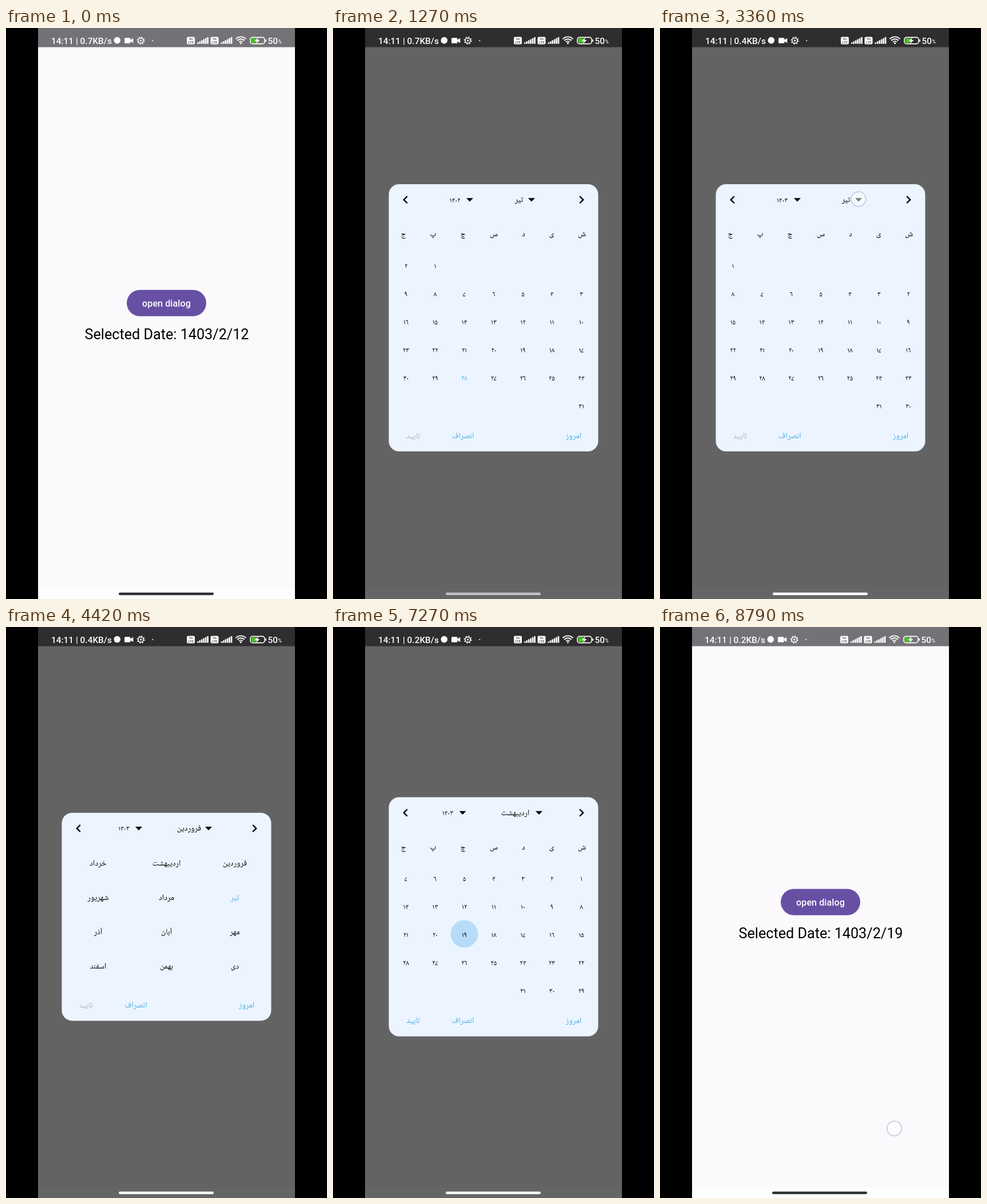
Recreate the animation shown at these times as an HTML page. Size 561x998 px, loop 8820 ms.

```html
<!DOCTYPE html>
<html lang="en">
<head>
<meta charset="utf-8">
<title>Date picker dialog</title>
<style>
html, body { margin: 0; width: 100%; height: 100%; overflow: hidden; background: #000; }
svg { display: block; width: 561px; height: 998px; }
text { font-family: Roboto, sans-serif; text-anchor: middle; }
.fa { font: 14px "Noto Naskh Arabic", "DejaVu Sans", sans-serif; }
.num { font: 12.5px "Noto Naskh Arabic", "DejaVu Sans", sans-serif; }
.accent { fill: #43abe3; }
.white { fill: #fff; }
.line { fill: none; stroke: #fff; stroke-width: 1.6; }
.speed { font-size: 15.4px; font-weight: 500; text-anchor: start; fill: #fff; }
.tiny { font-size: 5.6px; font-weight: 700; fill: #625f64; }
.chevron { fill: none; stroke: #0b0d10; stroke-width: 2.5; }
.tap { fill: rgba(255,255,255,.5); stroke: #c4cce8; stroke-width: 1.8; }
</style>
</head>
<body>
<svg id="stage" viewBox="0 0 561 998"></svg>
<script>
const LOOP = 8820;
const rules = [];

// Adds a looping animation; stops are [ms, css declarations].
function track(id, stops) {
  const all = [[0, stops[0][1]], ...stops, [LOOP, stops[stops.length - 1][1]]];
  const frames = all.map(([ms, css]) => `${(ms / LOOP * 100).toFixed(3)}%{${css}}`).join("");
  rules.push(`@keyframes ${id}{${frames}} #${id}{animation:${id} ${LOOP}ms linear infinite}`);
}

// Visible between two times, with optional fades.
function show(id, from, to, fadeIn = 1, fadeOut = 1) {
  const stops = from ? [[from, "opacity:0"], [from + fadeIn, "opacity:1"]] : [[0, "opacity:1"]];
  if (to < LOOP) stops.push([to - fadeOut, "opacity:1"], [to, "opacity:0"]);
  track(id, stops);
}

const fa = n => String(n).replace(/\d/g, d => "۰۱۲۳۴۵۶۷۸۹"[d]);
const text = (x, y, s, cls, more = "") => `<text x="${x}" y="${y}" class="${cls}" ${more}>${s}</text>`;
const rect = (x, y, w, h, more = "") => `<rect x="${x}" y="${y}" width="${w}" height="${h}" ${more}/>`;
const circle = (x, y, r, more = "") => `<circle cx="${x}" cy="${y}" r="${r}" ${more}/>`;
const path = (d, more = "") => `<path d="${d}" ${more}/>`;
const group = (id, body) => `<g id="${id}">${body}</g>`;

/* Status bar */
const speeds = ["0.7", "0.4", "0.2"].map((v, i) =>
  text(79, 27.5, `14:11 | ${v}KB/s`, "speed", `id="speed${i}"`)).join("");

const sim = x => rect(x, 15.5, 14, 13, 'rx="2.5" class="white"')
  + text(x + 7, 21.3, "Vo", "tiny") + text(x + 7, 27, "LTE", "tiny")
  + [0, 1, 2, 3, 4, 5].map(i =>
      rect(x + 18 + i * 3.45, 25.2 - i * 1.85, 2.6, 2.4 + i * 1.85, 'class="white"')).join("");

const wifi = [4.2, 8, 11.8].map(r =>
  path(`M${410.5 - r * .76} ${27.5 - r * .68}A${r} ${r} 0 0 1 ${410.5 + r * .76} ${27.5 - r * .68}`,
    'class="line" style="stroke-width:1.9"')).join("") + circle(410.5, 26.6, 1.6, 'class="white"');

const battery = rect(427, 16.4, 25, 11.2, 'rx="3.6" class="line"')
  + rect(428.6, 18, 9.5, 8, 'rx="2" fill="#45c31f"')
  + path("M441 16.5L434.5 23H438.5L437 27.8L443.5 21H439.6Z", 'class="white"')
  + rect(453.3, 19.8, 1.7, 4.4, 'rx=".8" class="white"');

const bar = speeds
  + circle(194.3, 21.6, 5.8, 'class="white"')
  + rect(207, 17.3, 10.5, 9.4, 'rx="1.5" class="white"') + path("M217 21L222.3 17.8V26.3L217 23Z", 'class="white"')
  + circle(235.6, 22, 4.6, 'class="line"') + circle(235.6, 22, 6.2, 'class="line" stroke-dasharray="2 2.87"')
  + circle(235.6, 22, 1.7, 'class="white"') + circle(256.3, 22, 1.1, 'class="white"')
  + sim(316) + sim(357.5) + wifi + battery
  + text(466.3, 27.5, "50", "white", 'font-size="15.4" font-weight="500"')
  + text(478.5, 27.3, "%", "white", 'font-size="8.5" font-weight="500"');

/* Main screen */
const screen = rect(56, 0, 449, 998, 'fill="#fbf9fc"') + rect(56, 0, 449, 33.5, 'fill="#757277"')
  + rect(56, 980, 449, 18, 'fill="#fefefe"')
  + rect(211, 457.7, 139, 46, 'rx="23" fill="#6750a4"')
  + rect(211, 457.7, 139, 46, 'rx="23" fill="#fff" fill-opacity=".14" id="press"')
  + text(280.5, 487, "open dialog", "white", 'font-size="16" font-weight="500" letter-spacing=".11"')
  + ["12", "19"].map((d, i) =>
      text(281, 544.3, `Selected Date: 1403/2/${d}`, "date", `id="date${i}" font-size="25.2"`)).join("");

/* Dialog */
const cols = [434, 382.5, 332, 281, 229.5, 178.5, 127.5];
const weekX = [435, 382, 333, 281, 227, 175, 123];

function month(id, top, first, today, picked) {
  let out = [..."شیدسچپج"].map((c, i) => text(weekX[i], top + 91, c, "fa")).join("");
  for (let day = 1; day <= 31; day++) {
    const cell = day - 1 + first, x = cols[cell % 7], y = top + 142 + 49 * Math.floor(cell / 7);
    if (day === picked) out += circle(x, y - 1, 24, 'id="picked" fill="#b7dcf9"');
    out += text(x, y + 4.5, fa(day), day === today ? "num accent" : "num");
  }
  return group(id, out);
}

const grid = (id, names, current) => group(id, names.map((n, i) =>
  text(400 - i % 3 * 119.5, 417 + Math.floor(i / 3) * 60, n, i === current ? "fa accent" : "fa")).join(""));

const years = Array.from({ length: 12 }, (_, i) => fa(1399 + i));
const months = "فروردین اردیبهشت خرداد تیر مرداد شهریور مهر آبان آذر دی بهمن اسفند".split(" ");

const caret = x => path(`M${x - 6} 297.3H${x + 6}L${x} 303.6Z`);
const title = (id, year, yx, yc, name, mx, mc) => group(id,
  text(yx, 304.5, fa(year), "num") + caret(yc) + text(mx, 304.3, name, "fa") + caret(mc));

const header = circle(127, 300, 23, 'id="ripple" fill="#000" fill-opacity=".19"')
  + path("M129.8 294.2L123.8 300.2L129.8 306.2", 'class="chevron"')
  + path("M431.2 294.2L437.2 300.2L431.2 306.2", 'class="chevron"')
  + title("title0", 1402, 213, 239, months[3], 325, 347)
  + title("title1", 1403, 213.5, 240, months[3], 325, 347)
  + title("title2", 1403, 206, 232, months[0], 320, 354)
  + title("title3", 1403, 200.5, 226.5, months[1], 318.5, 360);

const footer = text(140, 716.5, "تایید", "fa", 'id="confirm"')
  + text(227, 716.5, "انصراف", "fa accent") + text(420.5, 716.5, "امروز", "fa accent");

const dialog = rect(97.5, 273, 366, 467, 'rx="18" fill="#ecf5ff" id="card"')
  + month("tir1402", 273, 5, 28) + month("tir1403", 273, 6)
  + month("farvardin", 297.5, 4) + month("ordibehesht", 297.5, 0, 0, 19)
  + grid("years", years, 3) + grid("months", months, 3)
  + group("header", header) + group("footer", footer);

/* Touches: x, y, from, to, fade out */
const taps = [
  [285, 484, 120, 330, 60], [239, 300, 1550, 1690, 40], [281, 472, 2420, 2540, 40],
  [347, 299, 3360, 3490, 40], [400, 412, 4240, 4360, 40], [127, 325, 5180, 5300, 40],
  [229, 538, 6480, 6600, 40], [143, 691, 7290, 7620, 200],
  [409.5, 882.5, 8300, 8450, 40], [409.5, 876.5, 8760, LOOP, 1]
];
const touches = taps.map(([x, y], i) => circle(x, y, 12.8, `class="tap" id="tap${i}"`)).join("");

document.getElementById("stage").innerHTML = screen
  + rect(56, 0, 449, 998, 'id="dim"')
  + group("dialog", dialog)
  + group("bar", bar + rect(197, 986.8, 166, 4.4, 'rx="2.2" id="handle"'))
  + touches;

/* Timing */
const OPEN = 830, CLOSE = 7390;
track("dim", [[OPEN, "opacity:0"], [OPEN + 300, "opacity:.6"], [CLOSE, "opacity:.6"], [CLOSE + 170, "opacity:0"]]);

const pose = [];
for (let i = 0; i <= 12; i++) {
  const e = 1 - (1 - i / 12) ** 2.5;
  pose.push([OPEN + 25 * i, `opacity:${e};transform:translateY(${24 * (1 - e)}px)`]);
}
for (let i = 0; i <= 8; i++) {
  const e = (i / 8) ** 1.7;
  pose.push([CLOSE + 170 * i / 8, `opacity:${1 - e};transform:translateY(${-12 * e}px)`]);
}
track("dialog", pose);

// The card stays centred, so header and footer move by half the change in height.
const heights = [[1740, 467], [1900, 363], [2600, 363], [2760, 467], [3560, 467], [3720, 363], [4420, 363], [4560, 418]];
const sized = css => heights.map(([ms, h]) => [ms, css(h, (467 - h) / 2)]);
track("card", sized((h, d) => `y:${273 + d}px;height:${h}px`));
track("header", sized((h, d) => `transform:translateY(${d}px)`));
track("footer", sized((h, d) => `transform:translateY(${-d}px)`));

show("tir1402", 0, 1840, 1, 100);
show("years", 1780, 2700, 120, 100);
show("tir1403", 2640, 3660, 120, 100);
show("months", 3600, 4520, 120, 100);
show("farvardin", 4460, 5320, 120);
show("ordibehesht", 5320, LOOP);
[0, 2580, 4400, 5320, LOOP].forEach((ms, i, all) => i < 4 && show("title" + i, ms, all[i + 1]));
[0, 2000, 5300, LOOP].forEach((ms, i, all) => i < 3 && show("speed" + i, ms, all[i + 1]));
show("date0", 0, CLOSE);
show("date1", CLOSE, LOOP);
show("press", 150, 560, 80, 180);
show("ripple", 5200, 6120, 120, 270);
show("picked", 6580, LOOP, 120);
track("confirm", [[6580, "fill:#a6adb4"], [6600, "fill:#43abe3"]]);
track("handle", [[950, "fill:#303034"], [1210, "fill:#bebdc0"], [1390, "fill:#c8c7c9"], [1550, "fill:#c8c7c9"],
  [1650, "fill:#fff"], [7480, "fill:#fff"], [7600, "fill:#eee"], [7860, "fill:#303034"]]);
track("bar", [[8000, "transform:translateX(0)"], [8001, "transform:translateX(-1px)"]]);
taps.forEach(([, , from, to, out], i) => show("tap" + i, from, to, 1, out));

const sheet = document.createElement("style");
sheet.textContent = rules.join("\n");
document.head.append(sheet);
</script>
</body>
</html>
```
